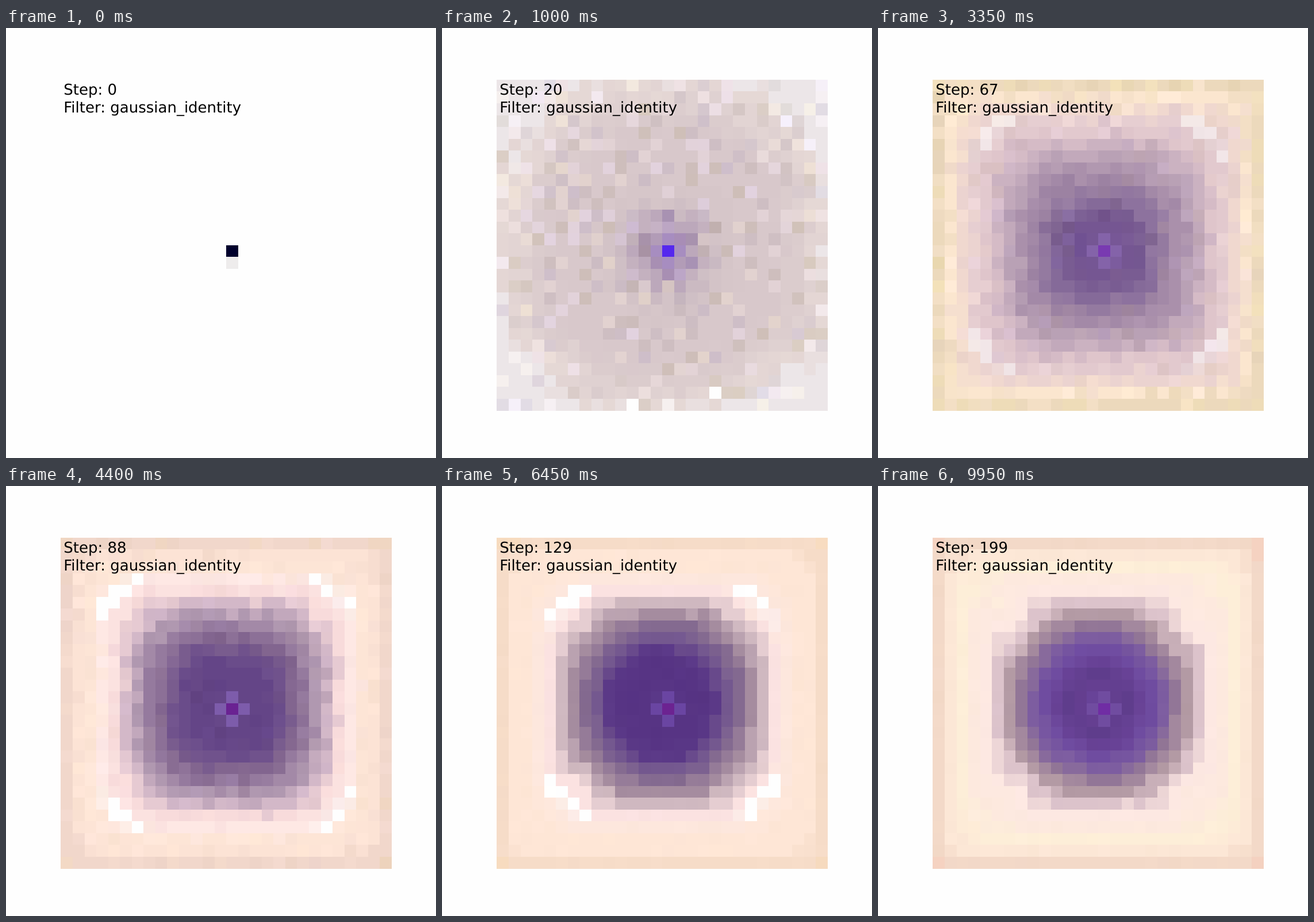
Animation, 748 px wide and 748 px high, one loop 10 s. Source, as an HTML page with a canvas:

```html
<!DOCTYPE html>
<html lang="en">
<head>
<meta charset="utf-8">
<title>Growing grid</title>
<style>
  html, body { margin: 0; width: 100%; height: 100%; overflow: hidden; background: #fefefe; }
  canvas, svg { position: absolute; left: 0; top: 0; width: 748px; height: 748px; }
  text { font: 26px "DejaVu Sans", sans-serif; text-rendering: geometricPrecision; }
</style>
</head>
<body>
<canvas id="grid" width="748" height="748"></canvas>
<svg viewBox="0 0 748 748">
  <text id="step" x="100.3" y="116">Step: 0</text>
  <text x="100.3" y="147">Filter: gaussian_identity</text>
</svg>
<script>
const N = 28, STEPS = 200, STEP_MS = 50;
const ctx = document.getElementById('grid').getContext('2d');
const label = document.getElementById('step');

// ring: colours from the centre outwards, one per cell of distance
// p, box, bend: roundness inside, at the border, and how late it changes
// off: shift of the centre towards the seed cell
// jit: ragged edges, tone: strength of the flecks
// white, arc, reach: strength, start and extent of the pale corner arcs
const KEYS = [
  { s: 0, p: 2.2, box: 3, bend: 6, off: 0.5, jit: 0, tone: 0, white: 0, arc: 18, reach: 10.5,
    seed: '00002c', halo: 'eeecec', ring: 'eeecec '.repeat(15).trim() },
  { s: 20, p: 2.2, box: 3, bend: 6, off: 0.5, jit: 1, tone: 10, white: 0, arc: 18, reach: 10.5,
    seed: '5528ee', halo: 'a78dc0',
    ring: 'a78ab8 a88fb3 bca8bb cbbac2 d3c3c7 d6c6c9 d8c8cb d8c8cb d8c8cb d8c8cb d9cacc dccdce e2d4d3 e5d8d5 ece6e8' },
  { s: 46, p: 2.4, box: 20, bend: 3, off: 0.5, jit: 0.8, tone: 7, white: 0, arc: 18, reach: 10.5,
    seed: '8852d0', halo: '8a69a6',
    ring: '8a69a6 8666a0 876898 967da2 aa92b0 b59eb5 bea6b8 c1a9b9 c3abba c6aebb cdb4be e2cbc8 fae8c8 e6dbac f3e9b0' },
  { s: 88, p: 3, box: 20, bend: 6, off: 0.25, jit: 0.3, tone: 3, white: 1, arc: 18, reach: 10.5,
    seed: '6a2292', halo: '7d5cab',
    ring: '664789 644587 644587 644587 70528c 82658f 957a9e b098b0 d3b8c8 f8dbdb fee8e4 fde5d6 fce3d5 f1d7cb eed4b9' },
  { s: 129, p: 2.1, box: 20, bend: 6, off: 0, jit: 0.2, tone: 1, white: 1, arc: 16, reach: 9.5,
    seed: '6c2391', halo: '6a45a2',
    ring: '5c3b8c 573484 573484 573484 5b3987 74588f 846a90 a58c9f cfb8c0 fbe2e1 fde7dd fee6d6 fee6d6 f6dcc8 f7d9b5' },
  { s: 167, p: 2, box: 20, bend: 6, off: 0, jit: 0.2, tone: 1, white: 0, arc: 16, reach: 9.5,
    seed: '702a96', halo: '714ca4',
    ring: '674895 5f3d8e 5c3b8a 654493 6b4898 7a5a98 8e7596 af97a5 dac0cb fde7e2 fde8df fdeed8 fce7d8 f4d9c8 f6d0b8' },
  { s: 199, p: 2, box: 20, bend: 6, off: 0, jit: 0.2, tone: 1, white: 0, arc: 16, reach: 9.5,
    seed: '702da4', halo: '704ca0',
    ring: '684398 653f91 5f3d8c 684296 6f4ca0 7d5da0 927697 b39aa4 dcc3cb fde8e2 fde9de fdeed8 fce7d6 f3d9c8 f6cbb9' }
];
const FIELDS = ['p', 'box', 'bend', 'off', 'jit', 'tone', 'white', 'arc', 'reach'];

const clamp = (v, a, b) => Math.max(a, Math.min(b, v));
const lerp = (a, b, t) => a + (b - a) * t;
const mix = (a, b, t) => a.map((v, i) => lerp(v, b[i], t));
const rgb = hex => [0, 2, 4].map(i => parseInt(hex.slice(i, i + 2), 16));
const norm = (u, v, p) => {
  const m = Math.max(u, v);
  return m ? m * Math.pow(Math.pow(u / m, p) + Math.pow(v / m, p), 1 / p) : 0;
};
const edgeX = i => Math.round(95.4 + 20.554 * i);
const edgeY = i => Math.round(89.9 + 20.56 * i);
const WHITE = [254, 254, 254];

for (const k of KEYS) {
  k.seed = rgb(k.seed);
  k.halo = rgb(k.halo);
  k.ring = k.ring.split(' ').map(rgb);
}

// repeatable noise in 0..1
function hash(x, y, k) {
  let h = Math.imul(x + 11, 374761393) ^ Math.imul(y + 7, 668265263) ^ Math.imul(k + 3, 1274126177);
  h = Math.imul(h ^ (h >>> 13), 1274126177);
  h = Math.imul(h ^ (h >>> 15), 2246822519);
  return ((h ^ (h >>> 16)) >>> 0) / 4294967296;
}

function stateAt(s) {
  let i = 0;
  while (i < KEYS.length - 2 && s >= KEYS[i + 1].s) i++;
  const a = KEYS[i], b = KEYS[i + 1], t = (s - a.s) / (b.s - a.s);
  const state = {
    seed: mix(a.seed, b.seed, t),
    halo: mix(a.halo, b.halo, t),
    ring: a.ring.map((c, n) => mix(c, b.ring[n], t))
  };
  for (const f of FIELDS) state[f] = lerp(a[f], b[f], t);
  return state;
}

function ringColour(ring, d) {
  const r = clamp(Math.round((d - 0.5) * 2) / 2, 0, ring.length - 1);
  const i = Math.min(Math.floor(r), ring.length - 2);
  return mix(ring[i], ring[i + 1], r - i);
}

function cellColour(x, y, s, st) {
  if (x === 14 && y === 14) return st.seed;
  const sx = Math.abs(x - 14), sy = Math.abs(y - 14);
  const first = x === 14 && y === 15;

  // growth front spreading from the seed, each cell with a random delay
  const born = first ? 0 : norm(sx, sy, 6) * 1.1 - Math.log(1 - hash(x, y, 90)) * 1.2;
  if (s < born) return WHITE;
  if (sx + sy === 1) return st.halo;

  // flecks change quickly at first and settle later
  const k = 20 * (1 - Math.exp(-s / 70)) + hash(x, y, 91);
  const k0 = Math.floor(k);
  const wobble = lerp(hash(x, y, k0), hash(x, y, k0 + 1), k - k0) * 2 - 1;
  const fleck = hash(x, y, k0 + 40) * 2 - 1;

  const dx = x - 13.5, dy = y - 13.5;
  const m = Math.max(Math.abs(dx), Math.abs(dy)), far = m / 13.5;
  const off = st.off * (1 - far * far);
  const p = lerp(st.p, st.box, Math.pow(far, st.bend));
  const d = norm(Math.abs(dx - off), Math.abs(dy - off), p);
  let c = ringColour(st.ring, d + wobble * st.jit);

  const arc = Math.abs(dx) + Math.abs(dy) - st.arc;
  if (m <= st.reach && arc >= 0 && arc <= 1.6) c = mix(c, WHITE, st.white * (fleck > -0.4 ? 1 : 0.3));

  if (Math.abs(fleck) > 0.65) {
    const shift = Math.sign(fleck) * st.tone;
    const tint = (hash(x, y, k0 + 70) * 2 - 1) * st.tone;
    c = [c[0] + shift, c[1] + shift, c[2] + shift + tint];
  }
  return mix(WHITE, c, clamp((s - born) / 2 + 0.4, first ? 1 : 0, 1));
}

function draw(s) {
  const st = stateAt(s);
  ctx.fillStyle = '#fefefe';
  ctx.fillRect(0, 0, 748, 748);
  for (let y = 0; y < N; y++) {
    for (let x = 0; x < N; x++) {
      const c = cellColour(x, y, s, st).map(n => clamp(Math.round(n), 0, 255));
      ctx.fillStyle = `rgb(${c})`;
      ctx.fillRect(edgeX(x), edgeY(y), edgeX(x + 1) - edgeX(x), edgeY(y + 1) - edgeY(y));
    }
  }
  label.textContent = 'Step: ' + s;
}

let start = null, shown = -1;
function tick(now) {
  if (start === null) start = now;
  const s = Math.floor(Math.max(0, now - start) / STEP_MS) % STEPS;
  if (s !== shown) draw(shown = s);
  requestAnimationFrame(tick);
}
draw(0);
requestAnimationFrame(tick);
</script>
</body>
</html>
```
